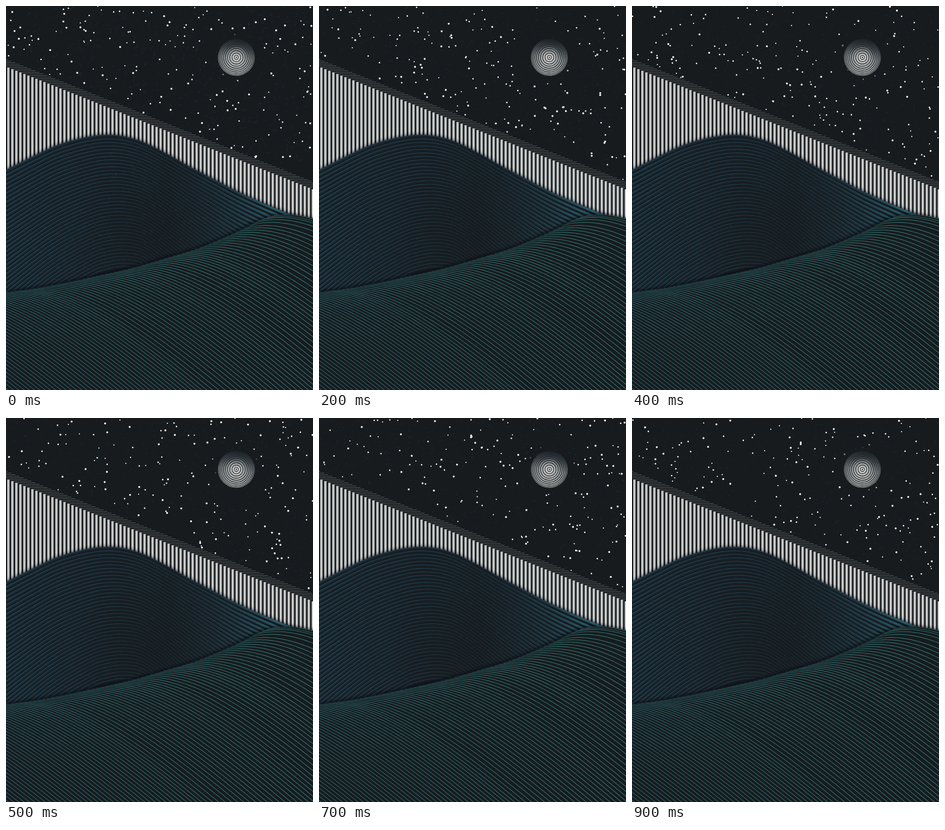
An HTML page for the animation above (1000 ms loop, 669 by 837 pixels).

```html
<!DOCTYPE html>
<html lang="en">
<head>
<meta charset="utf-8">
<title>Night dunes</title>
<style>
html, body { margin: 0; width: 100%; height: 100%; overflow: hidden; background: #171b1e; }
svg { display: block; width: 100vw; height: 100vh; }
</style>
</head>
<body>
<svg viewBox="0 0 669 837" preserveAspectRatio="none" fill="none">
  <defs>
    <linearGradient id="bar">
      <stop offset="0" stop-color="#8d9394"/>
      <stop offset=".2" stop-color="#d9d9d6"/>
      <stop offset=".6" stop-color="#c3c5c4"/>
      <stop offset="1" stop-color="#596164"/>
    </linearGradient>
    <linearGradient id="ridge" gradientUnits="userSpaceOnUse" x1="0" y1="0" x2="669" y2="0">
      <stop offset="0" stop-color="#24485a"/>
      <stop offset=".35" stop-color="#223f50"/>
      <stop offset=".52" stop-color="#1e3440"/>
      <stop offset=".75" stop-color="#264b5a"/>
      <stop offset=".9" stop-color="#2f6675"/>
    </linearGradient>
    <linearGradient id="thick" gradientUnits="userSpaceOnUse" x1="0" y1="0" x2="669" y2="0">
      <stop offset="0" stop-color="#234b5e" stop-opacity=".38"/>
      <stop offset=".34" stop-color="#21435a" stop-opacity=".08"/>
      <stop offset=".54" stop-color="#21435a" stop-opacity=".04"/>
      <stop offset=".75" stop-color="#2a6072" stop-opacity=".38"/>
      <stop offset=".9" stop-color="#31768a" stop-opacity=".7"/>
    </linearGradient>
    <radialGradient id="hollow" gradientUnits="userSpaceOnUse" cx="325" cy="510" r="190">
      <stop offset="0" stop-color="#171b1e" stop-opacity=".5"/>
      <stop offset="1" stop-color="#171b1e" stop-opacity="0"/>
    </radialGradient>
    <linearGradient id="front" gradientUnits="userSpaceOnUse" x1="0" y1="600" x2="600" y2="480">
      <stop offset="0" stop-color="#2d626b"/>
      <stop offset="1" stop-color="#377674"/>
    </linearGradient>
    <linearGradient id="moonFill" gradientUnits="userSpaceOnUse" x1="510" y1="73" x2="499" y2="148">
      <stop offset="0" stop-color="#1a2228"/>
      <stop offset=".25" stop-color="#414a4f"/>
      <stop offset=".55" stop-color="#8d9192"/>
      <stop offset="1" stop-color="#b4b6b5"/>
    </linearGradient>
    <radialGradient id="moonGlow" gradientUnits="userSpaceOnUse" cx="502" cy="112" r="26">
      <stop offset="0" stop-color="#dededb"/>
      <stop offset="1" stop-color="#d0d0ce" stop-opacity="0"/>
    </radialGradient>
    <radialGradient id="halo" gradientUnits="userSpaceOnUse" cx="502" cy="108" r="58">
      <stop offset=".72" stop-color="#171b1e"/>
      <stop offset="1" stop-color="#171b1e" stop-opacity="0"/>
    </radialGradient>
    <filter id="soft" x="-5%" y="-10%" width="110%" height="120%"><feGaussianBlur stdDeviation="4"/></filter>
    <clipPath id="backClip"><path id="backArea"/></clipPath>
    <clipPath id="frontClip"><path id="frontArea"/></clipPath>
  </defs>
  <rect width="669" height="837" fill="#171b1e"/>
  <g id="stars" stroke="#f3f3ef" stroke-linecap="round"></g>
  <g id="moon"></g>
  <g id="wall"></g>
  <g id="back"></g>
  <g id="near"></g>
  <path id="grain" stroke="#25587a" stroke-width=".7" stroke-opacity=".4"/>
</svg>
<script>
const W = 669, H = 837, STEPS = 10;
const $ = id => document.getElementById(id);

function add(parent, tag, attrs) {
  const el = document.createElementNS("http://www.w3.org/2000/svg", tag);
  for (const key in attrs) el.setAttribute(key, attrs[key]);
  parent.appendChild(el);
  return el;
}

function seeded(seed) {
  return () => {
    seed = (seed + 0x6D2B79F5) | 0;
    let t = Math.imul(seed ^ seed >>> 15, 1 | seed);
    t = t + Math.imul(t ^ t >>> 7, 61 | t) ^ t;
    return ((t ^ t >>> 14) >>> 0) / 4294967296;
  };
}

// Smooth height function through a few points, straight beyond both ends.
function curve(pts) {
  const last = pts.length - 1;
  const slope = pts.map((p, i) => {
    const a = pts[Math.max(0, i - 1)], b = pts[Math.min(last, i + 1)];
    return (b[1] - a[1]) / (b[0] - a[0]);
  });
  return x => {
    if (x <= pts[0][0]) return pts[0][1] + slope[0] * (x - pts[0][0]);
    if (x >= pts[last][0]) return pts[last][1] + slope[last] * (x - pts[last][0]);
    let i = 0;
    while (x > pts[i + 1][0]) i++;
    const [x0, y0] = pts[i], [x1, y1] = pts[i + 1], w = x1 - x0, t = (x - x0) / w;
    const t2 = t * t, t3 = t2 * t;
    return y0 * (2 * t3 - 3 * t2 + 1) + slope[i] * w * (t3 - 2 * t2 + t)
      + y1 * (3 * t2 - 2 * t3) + slope[i + 1] * w * (t3 - t2);
  };
}

function trace(f, from = 0, to = W, step = 6) {
  let d = "";
  for (let x = from; x < to + step; x += step) {
    const y = f(x);
    d += (d ? "L" : "M") + x.toFixed(1) + " " + y.toFixed(1);
    if (y > H + 20) break;
  }
  return d;
}

const backTop = curve([[0, 357], [60, 327], [110, 304], [160, 289], [200, 282], [230, 281], [262, 285],
  [300, 297], [350, 322], [400, 350], [450, 376], [500, 402], [550, 425], [600, 446], [669, 474]]);
const backCore = curve([[0, 729], [100, 640], [190, 583], [230, 570], [262, 567], [295, 573],
  [340, 605], [420, 682], [520, 779], [669, 880]]);
const nearTop = curve([[0, 623], [60, 615], [130, 602], [200, 587], [270, 571], [340, 551], [400, 533],
  [450, 514], [500, 492], [540, 472], [570, 460], [600, 455], [640, 457], [669, 463]]);

const below = f => trace(f) + `L${W + 10} ${H}L0 ${H}Z`;

function drawMoon() {
  const g = $("moon"), c = { cx: 502, cy: 112 };
  add(g, "circle", { cx: 502, cy: 108, r: 58, fill: "url(#halo)" });
  add(g, "circle", { ...c, r: 40, fill: "url(#moonFill)" });
  add(g, "circle", { ...c, r: 26, fill: "url(#moonGlow)" });
  for (const r of [4.5, 9.5, 14.5, 19.3, 23.8, 28, 31.8, 35.2, 38.2])
    add(g, "circle", { ...c, r, stroke: "#202427", "stroke-width": 1.35 });
  add(g, "circle", { ...c, r: 1.5, fill: "#25292b" });
}

function drawWall() {
  const g = $("wall"), pitch = 8.73, grade = 0.4;
  add(g, "path", { d: `M0 117L${W} 384V480H0Z`, fill: "#15181a" });
  let ledges = "";
  for (let i = -6; i * pitch < W; i++) {
    const x = 2.5 + i * pitch, y = 133 + x * grade;
    ledges += `M${x.toFixed(1)} ${y.toFixed(1)}h44`;
    if (i >= -1) add(g, "rect", { x, y, width: 5.9, height: 480 - y, fill: "url(#bar)" });
  }
  add(g, "path", { d: ledges, stroke: "#61676a", "stroke-width": 1 });
}

function drawBack() {
  const g = $("back"), count = 38, shape = below(backTop);
  $("backArea").setAttribute("d", shape);
  add(g, "path", { d: shape, fill: "#0d1113", filter: "url(#soft)" });
  add(g, "path", { d: shape, fill: "#161c20" });
  const lines = add(g, "g", { "clip-path": "url(#backClip)" });
  let d = "";
  for (let k = 0; k <= count; k++)
    d += trace(x => backTop(x) + (backCore(x) - backTop(x)) * k / count + 1);
  add(lines, "path", { d, stroke: "url(#thick)", "stroke-width": 4.2, transform: "translate(0 2)" });
  add(lines, "path", { d, stroke: "url(#ridge)", "stroke-width": 1.3 });
  add(lines, "rect", { y: 270, width: W, height: 400, fill: "url(#hollow)" });
}

function drawNear() {
  const g = $("near"), shape = below(nearTop), fall = 0.9, bend = 160, lead = 22;
  $("frontArea").setAttribute("d", shape);
  add(g, "path", { d: shape, fill: "#0d1113", filter: "url(#soft)" });
  add(g, "path", { d: shape, fill: "#161c1f" });
  // Each line follows the crest's tangent at t and bends into the slope.
  let d = "";
  for (let t = 655; t > -450; t -= 9.8) {
    const y = nearTop(t), s = nearTop(t + 1) - y;
    const line = x => y + fall * (x - t) + (s - fall) * bend * (1 - Math.exp((t - x) / bend));
    d += trace(line, t + lead);
  }
  const lines = add(g, "g", { "clip-path": "url(#frontClip)" });
  add(lines, "path", { d, stroke: "url(#front)", "stroke-width": 1.25 });
  add(lines, "path", {
    d: trace(nearTop, -12, W + 12), stroke: "#161c1f", "stroke-width": 9,
    "stroke-opacity": .65, filter: "url(#soft)"
  });
}

const sizes = [2.6, 3.4, 4.3];

function makeStars(step) {
  const rnd = seeded(911 + step * 37), paths = sizes.map(() => "");
  for (let i = 0; i < 320; i++) {
    const x = rnd() * W, y = rnd() * 400, pick = rnd();
    if (y > 113 + x * 0.4) continue;
    paths[pick < 0.3 ? 0 : pick < 0.72 ? 1 : 2] += `M${x.toFixed(1)} ${y.toFixed(1)}h.01`;
  }
  return paths;
}

function makeGrain(step) {
  const rnd = seeded(5077 + step * 53), reach = step ? 4 : 8;
  let d = "";
  for (let i = 0; i < 2300; i++) {
    const x = rnd() * W, y = rnd() * H, a = rnd() * Math.PI, r = 1 + rnd() * reach;
    const onWall = y > 125 + x * 0.4 && y < backTop(x);
    if (onWall || (y > nearTop(x) && rnd() < 0.6)) continue;
    d += `M${x.toFixed(1)} ${y.toFixed(1)}l${(r * Math.cos(a)).toFixed(1)} ${(r * Math.sin(a)).toFixed(1)}`;
  }
  return d;
}

drawMoon();
drawWall();
drawBack();
drawNear();

const starPaths = sizes.map(w => add($("stars"), "path", { "stroke-width": w }));
const skies = Array.from({ length: STEPS }, (_, i) => makeStars(i));
const grains = Array.from({ length: STEPS }, (_, i) => makeGrain(i));
let shown = -1;

function render(now) {
  const step = Math.floor(now % 1000 / 100);
  if (step !== shown) {
    shown = step;
    starPaths.forEach((p, i) => p.setAttribute("d", skies[step][i]));
    $("grain").setAttribute("d", grains[step]);
  }
}

function tick() {
  render(performance.now());
  requestAnimationFrame(tick);
}
tick();
</script>
</body>
</html>
```
